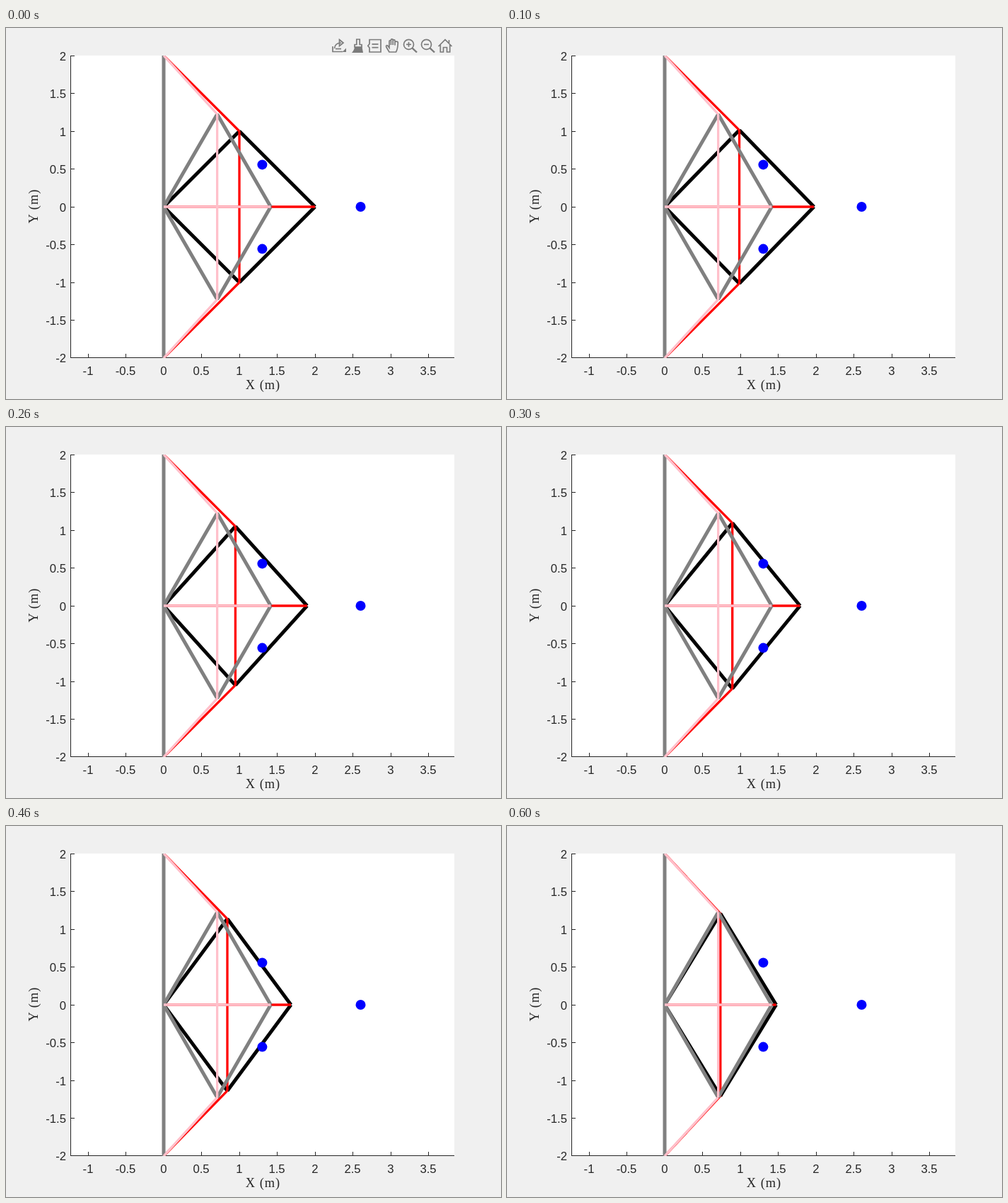
These frames come from a looping animation (700 by 525 pixels, 700 ms). An HTML page:

```html
<!DOCTYPE html>
<html lang="en">
<head>
<meta charset="utf-8">
<title>Linkage plot</title>
<style>
  html, body { margin: 0; width: 100%; height: 100%; overflow: hidden; background: #f0f0f0; }
  svg { display: block; width: 700px; height: 525px; }
  .axis { stroke: #262626; fill: none; shape-rendering: crispEdges; }
  .tick { font: 16.67px "Liberation Sans", Arial, sans-serif; fill: #262626; }
  .name { font: 18.4px "Liberation Serif", "Times New Roman", serif; fill: #262626; letter-spacing: 1px; text-anchor: middle; }
  .bar { stroke-width: 5; fill: none; }
  .cable { stroke-width: 3.3; fill: none; }
  .tools { fill: none; stroke: #7b7b7b; stroke-width: 1.7; }
  .tools .solid { fill: #7b7b7b; stroke: none; }
</style>
</head>
<body>
<svg viewBox="0 0 700 525">
  <defs><clipPath id="box"><rect x="91" y="39" width="543" height="428"/></clipPath></defs>
  <rect width="700" height="525" fill="#f0f0f0"/>
  <rect x="91" y="39" width="543" height="428" fill="#fff"/>
  <path class="axis" id="axes"/>
  <g id="labels" class="tick"></g>
  <text class="name" x="363.5" y="511">X (m)</text>
  <text class="name" transform="translate(44.5 252) rotate(-90)">Y (m)</text>

  <g clip-path="url(#box)">
    <path id="armBars" class="bar" stroke="#000"/>
    <path id="armCables" class="cable" stroke="#f00"/>
    <path id="wall" class="bar" stroke="#808080"/>
    <path id="goalBars" class="bar" stroke="#808080"/>
    <path id="goalCables" class="cable" stroke="#ffc0cb"/>
    <g fill="#00f">
      <circle cx="362.4" cy="193.4" r="7"/>
      <circle cx="362.4" cy="312.6" r="7"/>
      <circle cx="501.5" cy="253" r="7"/>
    </g>
  </g>

  <g id="tools" class="tools">
    <!-- export -->
    <path d="M462 26V33.5H476M464.5 29C465 23.5 468.5 21 474 21M471.5 16.5L477 21L471.5 25.5Z"/>
    <path d="M466 29.5H474"/>
    <path class="solid" d="M481 28.5V34H475.5Z"/>
    <!-- brush -->
    <path d="M495.8 16H500.2V23.5H503V27H493V23.5H495.8Z"/>
    <path class="solid" d="M493 26.5H503.5L505 35H489C491.5 32 492.5 30 493 26.5Z"/>
    <!-- data tip -->
    <path d="M514 16.5H530V34H514V28L511.8 25.2L514 22.5ZM517.5 22.8H526.5M517.5 27.7H526.5"/>
    <!-- hand -->
    <path d="M542 34L537.8 27C536.8 24.8 539 23.8 540.2 25.5L542 28V19C542 17 544.4 17 544.4 19V24V17.3C544.4 15.2 547.2 15.2 547.2 17.3V24V18C547.2 16.2 550 16.2 550 18V24.5V20.3C550 18.5 554.5 18.6 554.3 21C554 27 554 30 551.5 34Z"/>
    <!-- zoom in, zoom out -->
    <g id="lens"><circle cx="569.5" cy="23.3" r="7"/><path d="M566 23.3H573"/><path stroke-width="2.4" d="M574.5 28.3L581 34.5"/></g>
    <path d="M569.5 19.8V26.8"/>
    <use href="#lens" x="25"/>
    <!-- home -->
    <path d="M611.5 26L621 16.5L630.5 26M614.3 24V34H618.5V27.5H623.5V34H627.7V24M626.5 21V17"/>
  </g>
</svg>
<script>
  const X0 = 223, Y0 = 253, UNIT = 107;
  const get = id => document.getElementById(id);
  const draw = (id, d) => get(id).setAttribute("d", d);
  const at = ([x, y]) => `${X0 + x * UNIT} ${Y0 - y * UNIT}`;
  const lines = pairs => pairs.map(([a, b]) => `M${at(a)}L${at(b)}`).join("");

  // Four equal bars of length sqrt(2), given by the x of the tip
  function linkage(name, tipX) {
    const x = tipX / 2, y = Math.sqrt(2 - x * x);
    const root = [0, 0], tip = [tipX, 0], up = [x, y], low = [x, -y];
    draw(name + "Bars", lines([[root, up], [root, low], [up, tip], [low, tip]]));
    draw(name + "Cables", lines([[[0, 2], up], [[0, -2], low], [up, low], [root, tip]]));
  }

  function label(value, x, y, anchor) {
    const text = document.createElementNS("http://www.w3.org/2000/svg", "text");
    text.setAttribute("x", x);
    text.setAttribute("y", y);
    text.setAttribute("text-anchor", anchor);
    text.textContent = value;
    get("labels").append(text);
  }

  let axes = "M91.5 39V466.5H634";
  for (let v = -1; v <= 3.5; v += 0.5) {
    const x = Math.floor(X0 + v * UNIT);
    axes += `M${x + 0.5} 466V461`;
    label(v, x, 491, "middle");
  }
  for (let v = -2; v <= 2; v += 0.5) {
    const y = Math.min(466, Math.floor(Y0 - v * UNIT));
    axes += `M92 ${y + 0.5}H97`;
    label(v, 85, y + 6.5, "end");
  }
  draw("axes", axes);
  draw("wall", lines([[[0, 2], [0, -2]]]));
  linkage("goal", Math.SQRT2);

  // The arm is sampled every 100 ms and holds between samples
  const STEP = 100;
  const tips = [2, 1.973, 1.895, 1.789, 1.682, 1.577, 1.473];
  let shown = -1;
  const start = performance.now();
  function tick() {
    const step = Math.floor((performance.now() - start) / STEP) % tips.length;
    if (step !== shown) {
      shown = step;
      linkage("arm", tips[step]);
      get("tools").style.display = step ? "none" : "";
    }
    requestAnimationFrame(tick);
  }
  tick();
</script>
</body>
</html>
```
